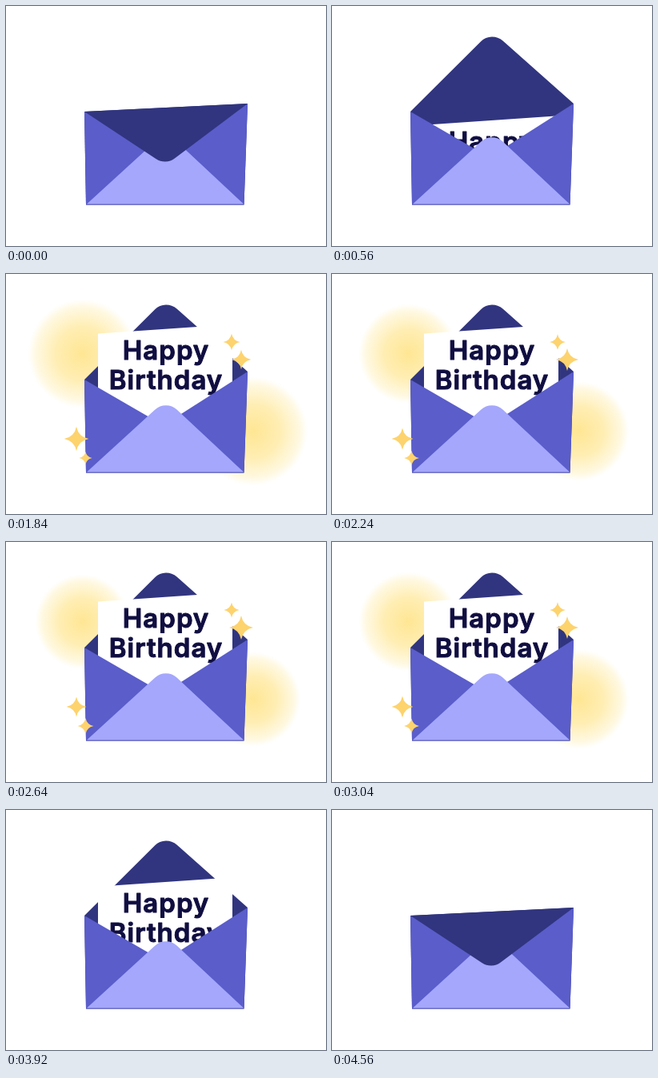
Write an HTML page with a canvas that moves like this. It is 400 px wide and 300 px high and loops after 5000 ms.

```html
<!DOCTYPE html>
<html lang="en">
<head>
<meta charset="utf-8">
<title>Birthday envelope</title>
<style>
  html, body { margin: 0; width: 100%; height: 100%; overflow: hidden; background: #fff; }
  canvas { display: block; width: 400px; height: 300px; }
</style>
</head>
<body>
<canvas id="stage" width="400" height="300"></canvas>
<script>
const ctx = document.getElementById('stage').getContext('2d');
const LOOP = 5000;
const MIRROR = 4570; // the closing plays the opening backwards
const DARK = '#31357f', SIDE = '#5a5dca', LIGHT = '#a4a7fb', INK = '#100e40';
const LEFT = [98, 132], RIGHT = [302, 122], BASE_L = [100, 248.5], BASE_R = [297.5, 248.5];

const GLOWS = [[95.5, 99.5], [309, 196.5]];
// x, y, resting size, size change at the height of a pulse
const STARS = [
  [88, 206, 12.5, 0.3],
  [99.5, 230, 10, -0.25],
  [294, 107, 15, -0.25],
  [282, 85, 9.5, 0.15]
];

const mix = (a, b, k) => a + (b - a) * k;
const span = (t, from, to) => Math.min(1, Math.max(0, (t - from) / (to - from)));
const easeInOut = u => (1 - Math.cos(Math.PI * u)) / 2;

function easeOutBack(u) {
  const c = 2.2, v = u - 1;
  return 1 + (c + 1) * v ** 3 + c * v ** 2;
}

function polygon(color, ...points) {
  ctx.fillStyle = color;
  ctx.beginPath();
  points.forEach(p => ctx.lineTo(...p));
  ctx.fill();
}

function roundedFlap(color, from, [apexX, apexY], to, ...rest) {
  ctx.fillStyle = color;
  ctx.beginPath();
  ctx.moveTo(...from);
  ctx.arcTo(apexX, apexY, ...to, 20);
  [to, ...rest].forEach(p => ctx.lineTo(...p));
  ctx.fill();
}

function glow(x, y, r) {
  const shade = ctx.createRadialGradient(x, y, 0, x, y, r);
  shade.addColorStop(0, 'rgba(255,212,70,.58)');
  shade.addColorStop(0.5, 'rgba(255,214,76,.42)');
  shade.addColorStop(0.85, 'rgba(255,218,86,.18)');
  shade.addColorStop(1, 'rgba(255,220,90,0)');
  ctx.fillStyle = shade;
  ctx.fillRect(x - r, y - r, 2 * r, 2 * r);
}

function star(x, y, r) {
  const k = r * 0.16;
  ctx.fillStyle = '#fdd36e';
  ctx.beginPath();
  ctx.moveTo(x, y - r);
  ctx.quadraticCurveTo(x + k, y - k, x + r, y);
  ctx.quadraticCurveTo(x + k, y + k, x, y + r);
  ctx.quadraticCurveTo(x - k, y + k, x - r, y);
  ctx.quadraticCurveTo(x - k, y - k, x, y - r);
  ctx.fill();
}

function card(drop) {
  polygon('#fff', [115, 74.5 + drop], [283, 63 + drop], [283, 200], [115, 200]);
  ctx.font = '600 33px Inter, sans-serif';
  ctx.letterSpacing = '1px';
  ctx.textAlign = 'center';
  ctx.lineJoin = 'round';
  ctx.lineWidth = 1;
  ctx.fillStyle = ctx.strokeStyle = INK;
  [['Happy', 106.5], ['Birthday', 143.5]].forEach(([word, y]) => {
    ctx.fillText(word, 200, y + drop);
    ctx.strokeText(word, 200, y + drop);
  });
}

function envelopeFront() {
  polygon(SIDE, LEFT, [200, 191], BASE_L);
  polygon(SIDE, RIGHT, [200, 187], BASE_R);
  polygon(SIDE, BASE_L, [200, 185], BASE_R);
  roundedFlap(LIGHT, [101, 247.6], [200, 157], [297, 247.6]);
}

function draw(t) {
  const pose = Math.min(t, MIRROR - t);
  const apex = [199.5, mix(199, 31, easeInOut(span(pose, 10, 510)))];
  const rise = easeOutBack(span(pose, 519, 1125));
  const grown = Math.min(span(t, 1140, 1680), 1 - span(t, 3120, 3440));
  const pulse = t > 1680 && t < 3120 ? Math.sin(Math.PI * (t - 1680) / 480) ** 2 : 0;
  const open = apex[1] < 127;

  ctx.fillStyle = '#fff';
  ctx.fillRect(0, 0, 400, 300);
  if (grown > 0) GLOWS.forEach(([x, y]) => glow(x, y, 59 * grown * (1 + 0.2 * pulse)));

  if (open) roundedFlap(DARK, LEFT, apex, RIGHT, BASE_R, BASE_L);
  else polygon(DARK, LEFT, RIGHT, BASE_R, BASE_L);
  if (rise > 0) card(mix(110, 0, rise));
  envelopeFront();
  if (!open) roundedFlap(DARK, LEFT, apex, RIGHT);

  if (grown > 0) STARS.forEach(([x, y, r, swing]) => star(x, y, r * grown * (1 + swing * pulse)));
}

const start = performance.now();
function tick() {
  draw((performance.now() - start) % LOOP);
  requestAnimationFrame(tick);
}
tick();
</script>
</body>
</html>
```
